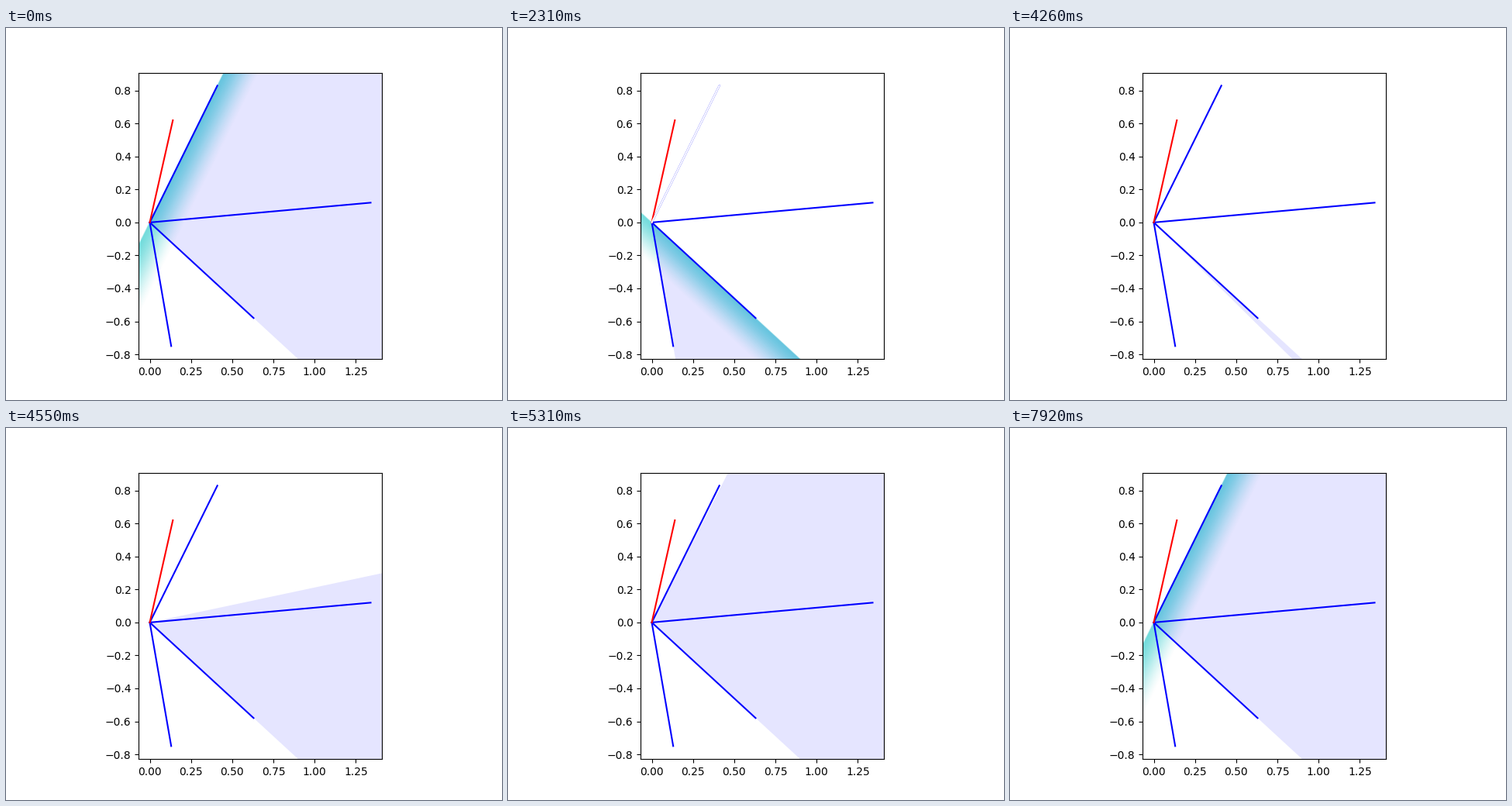
Recreate the animation shown at these times as a matplotlib script. Size 640 by 480 pixels, loop 8000 ms.

```python
import numpy as np
import matplotlib.pyplot as plt
from matplotlib.animation import FuncAnimation

FRAMES, INTERVAL = 250, 32   # 8 s loop
TICK = 33                    # ms per animation step

TARGET = np.array([0.14, 0.62])
UPPER = np.array([0.41, 0.83])
RIGHT = np.array([1.34, 0.12])
MIDDLE = np.array([0.63, -0.58])
LOWER = np.array([0.13, -0.75])

XLIM = (-0.067, 1.407)
YLIM = (-0.829, 0.909)
SCALE = 369.6 / (YLIM[1] - YLIM[0])   # pixels per data unit
BAND = 0.2
GROW_STEPS = 30
TURN_STEPS = 50


def unit(v):
    return v / np.hypot(*v)


fig, ax = plt.subplots(figsize=(6.4, 4.8), dpi=100)

# Pixel-centre coordinates for the shaded band
cols, rows = 628, 740
xs = XLIM[0] + (np.arange(cols) + 0.5) / cols * (XLIM[1] - XLIM[0])
ys = YLIM[0] + (np.arange(rows) + 0.5) / rows * (YLIM[1] - YLIM[0])
gx, gy = np.meshgrid(xs, ys)
rgba = np.zeros((rows, cols, 4))
rgba[..., 1:3] = 0.75

band = ax.imshow(rgba, extent=(*XLIM, *YLIM), origin="lower",
                 interpolation="bilinear", zorder=0.5)
cone = ax.fill([0, 1, 1], [0, 0, 1], color="blue", alpha=0.1, lw=0, zorder=1)[0]

for v in (UPPER, RIGHT, MIDDLE, LOWER):
    ax.plot([0, v[0]], [0, v[1]], color="blue")
ax.plot([0, TARGET[0]], [0, TARGET[1]], color="red")
cover, = ax.plot([], [], color="white", zorder=3)

ax.set_xlim(XLIM)
ax.set_ylim(YLIM)
ax.set_aspect("equal")


def set_cone(a, b):
    cone.set_xy([(0, 0), 10 * unit(a), 10 * unit(b)])


def set_band(v, grown):
    """Shade the side of the line through v that lies clockwise from it."""
    band.set_visible(grown > 0)
    if grown <= 0:
        return
    ux, uy = unit(v)
    dist = gx * uy - gy * ux
    u = np.clip(dist / (BAND * grown), 0, 1)
    smooth = 1 - u * u * (3 - 2 * u)
    edge = np.clip(dist * SCALE + 0.5, 0, 1)
    rgba[..., 3] = 0.56 * edge * (1 - u + smooth) / 2
    band.set_data(rgba)


def set_cover(v):
    if v is None:
        cover.set_data([], [])
    else:
        cover.set_data([0, v[0]], [0, v[1]])


def grown_at(step, start):
    return min(step - start, GROW_STEPS - 1) / GROW_STEPS


def update(i):
    step = int((i + 0.5) * INTERVAL // TICK)

    # Cone: lower wedge, then one edge sweeps up to the upper vector
    if step == 0 or step > 160:
        set_cone(UPPER, MIDDLE)
    elif step < 110:
        set_cone(LOWER, MIDDLE)
    else:
        t = min(step - 110, TURN_STEPS - 1) / TURN_STEPS
        set_cone((1 - t) * unit(LOWER) + t * unit(UPPER), MIDDLE)

    # Half-plane band
    if step < 30:
        set_band(UPPER, (GROW_STEPS - 1) / GROW_STEPS)
    elif step < 110:
        set_band(MIDDLE, grown_at(step, 30))
    elif step < 190:
        set_band(UPPER, 0)
    else:
        set_band(UPPER, grown_at(step, 190))

    # Blinking vectors
    if 70 <= step < 80 or 90 <= step < 100:
        set_cover(UPPER)
    elif 230 <= step < 240:
        set_cover(TARGET)
    else:
        set_cover(None)
    return band, cone, cover


anim = FuncAnimation(fig, update, frames=FRAMES, interval=INTERVAL,
                     repeat=True, repeat_delay=0)
plt.show()
```
